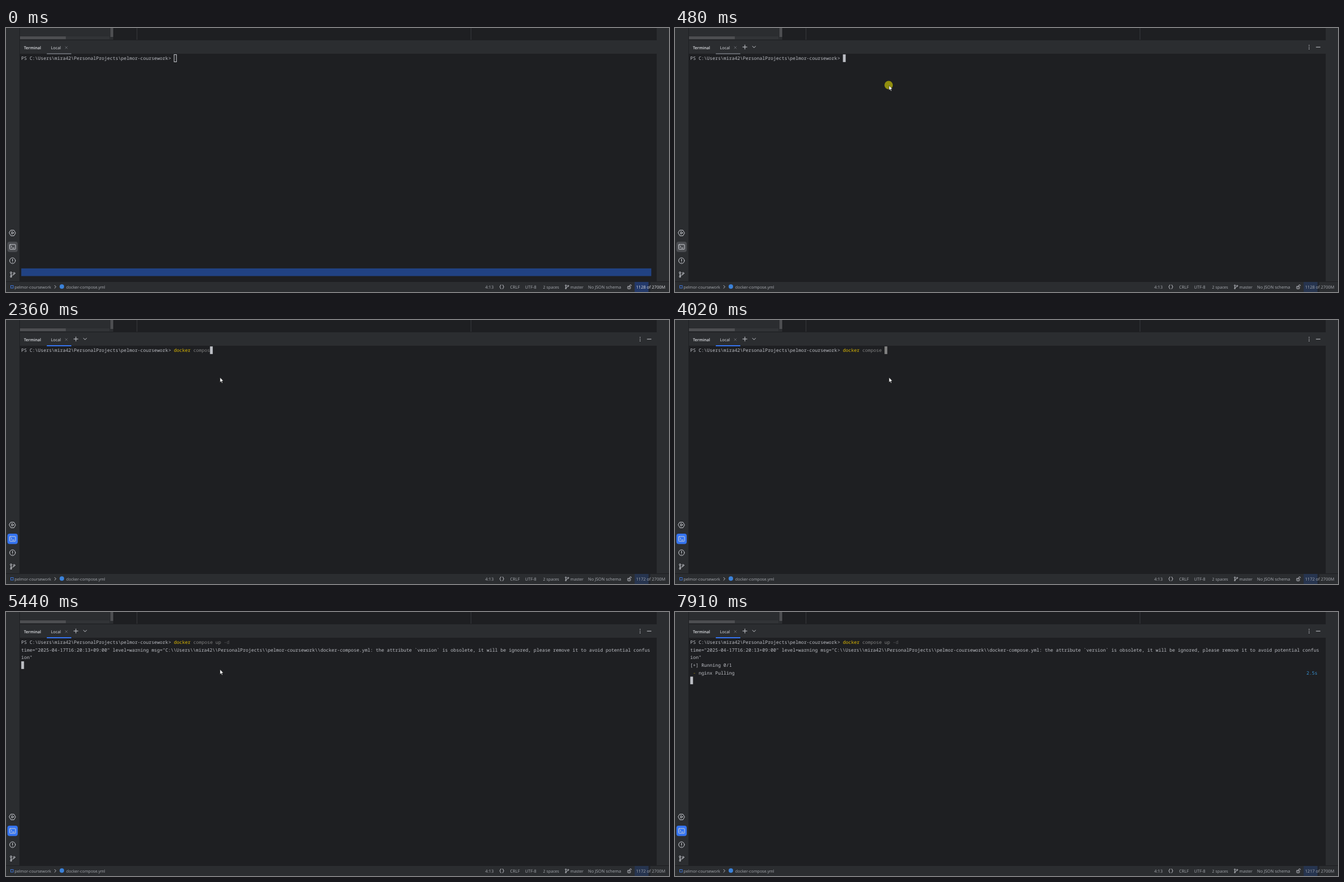
Recreate the animation shown at these times as an HTML page. Size 1187 px wide and 472 px high, loop 8 s.

```html
<!DOCTYPE html>
<html lang="en">
<head>
<meta charset="utf-8">
<title>Terminal session</title>
<style>
  html, body { margin: 0; width: 100%; height: 100%; overflow: hidden; background: #1e1f22; }
  svg { display: block; width: 100%; height: 100%; }
  text { white-space: pre; text-rendering: geometricPrecision; }
  .ui { font: 7.2px "Open Sans", "Noto Sans", sans-serif; fill: #a8abb1; }
  .ui .wide { font-size: 7.55px; }
  .ui .title { font-size: 7.3px; fill: #dfe1e5; }
  .ui .strong { font-weight: 600; }
  .mono { font: 8.282px "Noto Sans Mono", "DejaVu Sans Mono", monospace; fill: #bcbec4; }
  .panel { fill: #2b2d30; }
  .thumb { fill: #4d4e51; }
  .line { fill: none; stroke: #ced0d6; stroke-linecap: round; stroke-linejoin: round; }
  .command { fill: #e0bb02; }
  .argument { fill: #808080; }
  .option { fill: #5c5d5f; }
  .keyword { fill: #4fc414; }
  .error { fill: #ff4050; }
  .spinner { fill: #a68a0d; }
  .timer { fill: #3993d4; }
</style>
</head>
<body>
<svg viewBox="0 0 1187 472" preserveAspectRatio="none">
  <defs>
    <g id="branch" class="line">
      <circle cx="-2.7" cy="-3" r="1.5"/><circle cx="2.8" cy="-2" r="1.5"/><circle cx="-2.7" cy="4" r="1.3"/>
      <path d="M-2.7-1.5V2.7M2.8-.5Q2.8 1.5-2.7 1.5"/>
    </g>
  </defs>

  <!-- window frame -->
  <rect width="1187" height="472" fill="#1e1f22"/>
  <g class="panel">
    <rect width="24" height="453"/>
    <rect x="1165" width="22" height="453"/>
    <rect x="25" width="167" height="21"/>
    <rect x="25" y="22" width="1140" height="24"/>
    <rect y="454" width="1187" height="18"/>
  </g>
  <rect x="107" y="15" width="78" height="5" fill="#323437"/>
  <rect class="thumb" x="25" y="15" width="82" height="5"/>
  <rect class="thumb" x="187" width="5" height="16"/>
  <path d="M234.5 0V21M832.5 0V21" stroke="#36383c"/>

  <!-- left tool stripe -->
  <rect id="toolButton" x="2.5" y="382" width="18.5" height="18.5" rx="4"/>
  <g class="line">
    <path d="M8.8 361.5H14.2L17.2 366.5L14.2 371.5H8.8L5.8 366.5Z"/>
    <path d="M10.2 364.3V368.7L14 366.5Z"/>
    <rect x="6.5" y="387" width="10.5" height="8.7" rx="1"/>
    <path d="M8.5 389.3L10.4 391.1L8.5 392.9M11.5 393.3H14.5"/>
    <circle cx="11.7" cy="416" r="5.1"/>
    <path d="M11.7 413.3V416.4M11.7 418.5V418.6" stroke-width="1.2"/>
  </g>
  <use href="#branch" x="11.7" y="440.5"/>

  <!-- tool window header -->
  <g class="ui">
    <text class="title strong" x="32" y="37.6">Terminal</text>
    <text class="title" x="80.5" y="37.6">Local</text>
  </g>
  <path class="line" d="M106 33L110 37M110 33L106 37" style="stroke:#777a80" stroke-width=".7"/>
  <rect id="tabLine" x="73" y="45.1" width="44" height="1.9" rx=".6"/>
  <g id="actions">
    <path class="line" d="M121.3 34H128.9M125.1 30.2V37.8M138.8 32.6L141.5 35.3L144.2 32.6M1148 34.2H1155"/>
    <g fill="#ced0d6">
      <circle cx="1135.3" cy="31" r=".8"/><circle cx="1135.3" cy="34.2" r=".8"/><circle cx="1135.3" cy="37.4" r=".8"/>
    </g>
  </g>

  <!-- terminal -->
  <rect id="selection" x="27.3" y="429.8" width="1128" height="13.7" fill="#214283"/>
  <g class="mono" id="terminal"></g>
  <rect id="caret"/>

  <!-- status bar -->
  <rect id="memoryBar" x="1125.5" y="454" width="25" height="18"/>
  <rect x="1150.5" y="454" width="3" height="18" fill="#20232a"/>
  <rect x="8.5" y="460.5" width="4.5" height="4.5" fill="none" stroke="#3f74d4"/>
  <circle cx="100" cy="462.3" r="4" fill="#3b82d9"/>
  <g class="ui">
    <text x="15.3" y="465.6">pelmor-coursework</text>
    <text x="107.8" y="465.6">docker-compose.yml</text>
    <text class="wide" x="858" y="465.6">4:13</text>
    <text class="wide" x="902.6" y="465.6">CRLF</text>
    <text class="wide" x="929.3" y="465.6">UTF-8</text>
    <text x="961.6" y="465.6">2 spaces</text>
    <text x="1010.3" y="465.6">master</text>
    <text class="wide" x="1042" y="465.6">No JSON schema</text>
    <text class="wide" x="1128" y="465.6" id="memory"></text>
  </g>
  <g class="line" stroke-width=".9">
    <path d="M87 460.3L89.5 462.8L87 465.3"/>
    <path d="M886.3 459.3Q885 459.3 885 461Q885 462.8 883.8 462.8Q885 462.8 885 464.6Q885 466.3 886.3 466.3M889 459.3Q890.3 459.3 890.3 461Q890.3 462.8 891.5 462.8Q890.3 462.8 890.3 464.6Q890.3 466.3 889 466.3"/>
    <rect x="1113" y="462" width="5" height="4.3" rx=".8"/>
    <path d="M1116.6 462V460.8Q1116.6 459.2 1118.2 459.2Q1119.8 459.2 1119.8 460.8M1115.5 463.8V464.5"/>
  </g>
  <use href="#branch" transform="translate(1004.3 462.6) scale(.75)"/>

  <!-- mouse -->
  <g id="pointer">
    <circle id="click" cx="-.2" cy=".2" r="7.5" fill="#918e0e"/>
    <path d="M.5 1V9.6L2.5 7.8L3.9 11L5.2 10.5L3.8 7.3H6.5Z" fill="#fff" stroke="#111" stroke-width=".5"/>
  </g>
</svg>
<script>
  const LOOP = 8000, LEFT = 27.3, TOP = 47.2, CELL = 8.282 * 0.6, ROW = 13.665;
  const COMMAND = "docker compose up -d";
  const PATH = "PS C:\\Users\\mira42\\PersonalProjects\\pelmor-coursework";
  const WARNING = 'time="2025-04-17T16:20:13+09:00" level=warning msg="C:\\\\Users\\\\mira42\\\\PersonalProjects' +
    "\\\\pelmor-coursework\\\\docker-compose.yml: the attribute `version` is obsolete, it will be ignored, " +
    "please remove it to avoid potential confus";

  const KEYS = [1020, 1110, 1200, 1380, 1470, 1560, 1630, 1700, 1830, 1940, 2050, 2160, 2270, 2380, 2490,
    3490, 4240, 4460, 4560, 4770, 4900];
  const CLICK = 480, FOCUS = 550, RELEASE = 620;
  const BACKSPACE = 4020, RETYPE = 4240, ENTER = 5240, WARNED = 5440, POINTER_GONE = 7730;
  const TICKS = [5510, 5620, 5720, 5820, 5920, 6030, 6130, 6240, 6310, 6410, 6510, 6590, 6710,
    6810, 6910, 7010, 7110, 7240, 7310, 7450, 7550, 7640, 7730, 7820, 7910];
  const MOUSE = [[130, 1125, 462], [200, 870, 310], [270, 560, 165], [340, 415, 112], [410, 382.7, 101.8]];

  const $ = id => document.getElementById(id);
  const terminal = $("terminal");
  const passed = (times, t) => times.filter(time => time <= t).length;
  const show = (node, visible) => node.setAttribute("visibility", visible ? "inherit" : "hidden");
  const setText = (node, value) => { if (node.textContent !== value) node.textContent = value; };
  const setAttributes = (node, values) =>
    Object.entries(values).forEach(([name, value]) => node.setAttribute(name, value));

  function addText(col, row, value = "", style = "") {
    const node = document.createElementNS("http://www.w3.org/2000/svg", "text");
    setAttributes(node, { x: LEFT + col * CELL, y: TOP + 9.9 + row * ROW, class: style });
    node.textContent = value;
    return terminal.appendChild(node);
  }

  const start = PATH.length + 2;
  addText(0, 0, PATH);
  const promptSign = addText(PATH.length, 0, ">");
  const words = [[0, 6, "command"], [7, 17, "argument"], [18, 20, "option"]].map(([from, to, style]) =>
    ({ from, to, node: addText(start + from, 0, "", style) }));
  const warning = [addText(0, 1, WARNING), addText(0, 2, 'ion"')];
  const timer = addText(222, 4, "", "timer");
  const progress = [addText(0, 3, "[+] Running 0/1"), addText(1, 4, "-", "spinner"),
    addText(3, 4, "nginx Pulling"), timer];

  function drawCommand(typed) {
    words.forEach(({ from, to, node }) =>
      setText(node, COMMAND.slice(from, Math.max(from, Math.min(to, typed)))));
    // "do" alone is an unfinished shell keyword, so the prompt flags an error
    const unfinished = typed === 2;
    promptSign.setAttribute("class", unfinished ? "error" : "");
    words[0].node.setAttribute("class", unfinished ? "keyword" : "command");
  }

  function drawCaret(t, typed) {
    const row = t >= TICKS[0] ? 5 : t >= WARNED ? 3 : t >= ENTER ? 1 : 0;
    const hollow = t < CLICK;
    const inset = hollow ? 0.4 : 0;
    setAttributes($("caret"), {
      x: LEFT + (row ? 0 : (start + typed) * CELL) + inset,
      y: TOP + row * ROW + inset,
      width: CELL - 2 * inset,
      height: ROW - 2 * inset,
      fill: hollow ? "none" : t >= BACKSPACE && t < RETYPE ? "#808080" : "#bcbec4",
      stroke: hollow ? "#ced0d6" : "none"
    });
  }

  function drawMouse(t) {
    const step = passed(MOUSE.map(point => point[0]), t);
    show($("pointer"), step > 0 && t < POINTER_GONE);
    $("click").setAttribute("opacity", t >= CLICK && t < RELEASE ? 1 : 0);
    if (step) $("pointer").setAttribute("transform", `translate(${MOUSE[step - 1].slice(1)})`);
  }

  function drawWindow(t) {
    const entered = t >= MOUSE[0][0], focused = t >= FOCUS;
    show($("actions"), entered);
    show($("selection"), t < CLICK);
    $("toolButton").setAttribute("fill", focused ? "#3574f0" : "#4b4d51");
    $("tabLine").setAttribute("fill", focused ? "#3574f0" : "#62656b");
    $("memoryBar").setAttribute("fill", entered ? "#26344f" : "#23396a");
    $("memory").style.fill = entered ? "" : "#dfe1e5";
    setText($("memory"), (t < 1290 ? 1128 : t < 5970 ? 1172 : 1217) + " of 2700M");
  }

  function draw(t) {
    const typed = passed(KEYS, t) - passed([BACKSPACE], t);
    const ticks = passed(TICKS, t);
    drawCommand(typed);
    drawCaret(t, typed);
    drawMouse(t);
    drawWindow(t);
    warning.forEach(node => show(node, t >= WARNED));
    progress.forEach(node => show(node, ticks > 0));
    setText(timer, (ticks / 10).toFixed(1) + "s");
  }

  const began = performance.now();
  function frame() {
    draw((performance.now() - began) % LOOP);
    requestAnimationFrame(frame);
  }
  frame();
</script>
</body>
</html>
```
